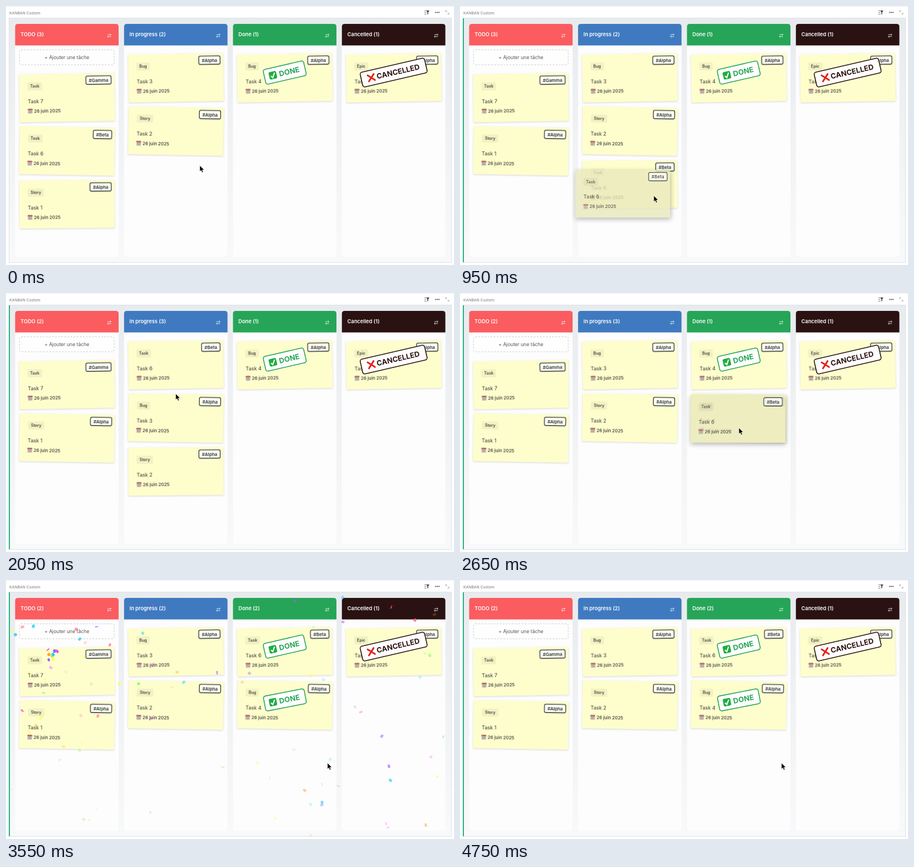
Animation, 800 px wide and 463 px high, one loop 4950 ms. Source, as an HTML page:

```html
<!DOCTYPE html>
<html lang="fr">
<head>
<meta charset="utf-8">
<title>Kanban</title>
<style>
  html, body { margin: 0; width: 100%; height: 100%; overflow: hidden; background: #fff; }
  svg { display: block; width: 100vw; height: 100vh; font-family: Inter, "Open Sans", sans-serif; }
  .card { filter: drop-shadow(.8px 1.6px 1.6px rgba(0, 0, 0, .16)); }
  .drag { filter: drop-shadow(1px 3px 4px rgba(0, 0, 0, .35)); opacity: .8; }
</style>
</head>
<body>
<svg id="stage" viewBox="0 0 800 463">
  <defs>
    <linearGradient id="board" x2="0" y2="1">
      <stop stop-color="#e8ebee"/><stop offset="1" stop-color="#f8f9fa"/>
    </linearGradient>
    <clipPath id="frame"><rect x="6" y="22" width="789" height="436"/></clipPath>
  </defs>
  <g id="back"></g>
  <g id="scene"></g>
</svg>
<script>
const LOOP = 4950, STEP = 50;
const back = document.getElementById('back');
const scene = document.getElementById('scene');

const columns = [
  { name: 'TODO', color: '#fa5c5f', top: 163.8 },
  { name: 'In progress', color: '#3f7ac0', top: 128.3 },
  { name: 'Done', color: '#26a558', top: 128.3 },
  { name: 'Cancelled', color: '#2b1212', top: 128.3 }
];
const tasks = {
  1: ['Story', '#Alpha'], 2: ['Story', '#Alpha'], 3: ['Bug', '#Alpha'], 4: ['Bug', '#Alpha'],
  5: ['Epic', '#Alpha'], 6: ['Task', '#Beta'], 7: ['Task', '#Gamma']
};
const badgeWidth = { Task: 26, Bug: 24, Story: 29.5, Epic: 25 };
const tagWidth = { '#Alpha': 38, '#Beta': 33, '#Gamma': 45 };
const tilts = [-1, 1, -.5];

// Board contents from each moment on: lists per column, then header counts.
const states = [
  { at: 0, lists: [[7, 6, 1], [3, 2], [4], [5]], counts: [3, 2, 1, 1] },
  { at: 750, lists: [[7, 1], [3, 2, 6], [4], [5]], counts: [3, 2, 1, 1] },
  { at: 1150, lists: [[7, 1], [6, 3, 2], [4], [5]], counts: [2, 3, 1, 1] },
  { at: 2400, lists: [[7, 1], [3, 6, 2], [4], [5]], counts: [2, 3, 1, 1] },
  { at: 2550, lists: [[7, 1], [3, 2], [4, 6], [5]], counts: [2, 3, 1, 1] },
  { at: 2850, lists: [[7, 1], [3, 2], [6, 4], [5]], counts: [2, 2, 2, 1] }
];
const drags = [
  { from: 650, to: 1100, dx: -55.5, dy: -3.5 },
  { from: 2250, to: 2800, dx: -2, dy: -16 }
];
const path = [
  [0, 346, 285], [50, 346, 285], [550, 165, 263], [600, 165, 263], [950, 346, 339], [1150, 346, 341],
  [1750, 314, 303], [1900, 314, 303], [2050, 303, 180], [2150, 305, 144], [2200, 305, 144],
  [2450, 346, 208], [2650, 498, 241], [2800, 498, 241], [3000, 574, 327]
];

const colX = i => 16.3 + 194.5 * i;
const rect = (x, y, w, h, attrs) => `<rect x="${x}" y="${y}" width="${w}" height="${h}" ${attrs}/>`;
const text = (x, y, size, weight, fill, str, attrs = '') =>
  `<text x="${x}" y="${y}" font-size="${size}" font-weight="${weight}" fill="${fill}" ${attrs}>${str}</text>`;
const line = (d, color, width, attrs = '') =>
  `<path d="${d}" fill="none" stroke="${color}" stroke-width="${width}" ${attrs}/>`;
const group = (x, y, angle, inner, attrs = '') =>
  `<g transform="translate(${x} ${y}) rotate(${angle})" ${attrs}>${inner}</g>`;

function background() {
  const dots = [767.3, 770.2, 773.1].map(x => `<circle cx="${x}" cy="11.5" r="1.1" fill="#444"/>`).join('');
  let out = rect(0, 0, 800, 463, 'fill="#fff"') + rect(0, 0, 800, 1, 'fill="#f0f0f0"') +
    text(6, 14.6, 6.8, 400, '#777', 'KANBAN Custom') +
    line('M747 8.5h3.5M747 11.5h3.5M747 14.5h4', '#777', .9) +
    '<path d="M750.5 8h5.5l-2 3.2v4l-1.5-1v-3z" fill="#444"/>' + dots +
    line('M785 11V8.5h2.5M791 12v2.500h-2.500M785.300 8.800l2 1.800M790.700 14.200l-2-1.800', '#aaa', .9) +
    rect(5.5, 21.5, 790, 437, 'fill="url(#board)" stroke="#dfe2e5" stroke-width="1"');
  columns.forEach((col, i) => {
    const x = colX(i);
    out += rect(x, 32, 184.8, 416.5, 'rx="5" fill="#fdfdfd"') +
      `<path d="M${x} 70.500v-33.500q0-5 5-5h174.800q5 0 5 5v33.500z" fill="${col.color}"/>` +
      line(`M${x + 165} 51.200h6.500m-1.800-1.700l1.800 1.700l-1.800 1.700M${x + 171.500} 54.700h-6.500m1.800-1.700l-1.800 1.700l1.800 1.700`, '#fff', .75);
  });
  return out + rect(24.2, 78.3, 169, 26.7, 'rx="3" fill="#fefefe" stroke="#c9c9c9" stroke-width="1" stroke-dasharray="3 2.5"') +
    text(108.8, 94.7, 8.6, 400, '#555', '+ Ajouter une tâche', 'text-anchor="middle"');
}

function stamp(done) {
  const w = done ? 74 : 118, color = done ? '#26a558' : '#2b1212';
  const icon = done
    ? rect(-28.5, -6.8, 13.6, 13.6, 'rx="2.500" fill="#1fae3f"') + line('M-25.500 .5l2.700 3.500l5-8', '#fff', 2.1)
    : line('M-46.500 -5.500l11 11M-35.500 -5.500l-11 11', '#e3231c', 3, 'stroke-linecap="round"');
  return group(0, -9.3, -12,
    rect(-w / 2, -13.5, w, 27, `rx="4" fill="#fff" fill-opacity=".96" stroke="${color}" stroke-width="1.600"`) +
    icon + text(done ? -10.3 : -31, 4.7, 13, 700, color, done ? 'DONE' : 'CANCELLED'));
}

function card(id, fill = '#fefecd') {
  const [kind, tag] = tasks[id], bw = badgeWidth[kind], tw = tagWidth[tag];
  return rect(-84.8, -42.8, 169.6, 85.6, `fill="${fill}"`) +
    rect(-70.2, -28.5, bw, 14.4, 'rx="2" fill="#000" fill-opacity=".05"') +
    text(-70.2 + bw / 2, -18.6, 7.2, 600, '#444', kind, 'text-anchor="middle"') +
    rect(79.4 - tw, -37.8, tw, 14.8, 'rx="2.500" fill="#fffff2" stroke="#2a2f36" stroke-width="1.300"') +
    text(79.4 - tw / 2, -27.5, 8, 600, '#2a2f36', tag, 'text-anchor="middle"') +
    text(-70, 8.8, 9, 400, '#333', 'Task ' + id) +
    rect(-70.3, 18.8, 8.6, 8.8, 'rx="1" fill="#d2cdc6"') +
    rect(-70.3, 18.8, 8.6, 2.8, 'rx=".8" fill="#b9635c"') +
    line('M-69 23.300h6M-69 25.700h6', '#857e78', 1.2, 'stroke-dasharray="1.500 .7"') +
    text(-59.3, 25.8, 8, 500, '#333', '26 juin 2025');
}

function cursorAt(t) {
  const i = path.findIndex(p => p[0] > t);
  if (i < 0) return path[path.length - 1].slice(1);
  const [t0, x0, y0] = path[i - 1], [t1, x1, y1] = path[i];
  const u = (t - t0) / (t1 - t0), k = u * u * (3 - 2 * u);
  return [x0 + (x1 - x0) * k, y0 + (y1 - y0) * k];
}

function makeConfetti() {
  const palette = ['#26ccff', '#a25afd', '#ff5e7e', '#88ff5a', '#fcff42', '#ffa62d', '#ff36ff'];
  let seed = 41;
  const rnd = () => (seed = seed * 16807 % 2147483647) / 2147483647;
  const bits = [];
  for (let birth = 3020; birth <= 4070; birth += 105) {
    for (const side of [.2, .75]) {
      const x = (side + (rnd() - .5) * .25) * 800, y = rnd() * 260 - 60;
      const count = birth === 3020 ? 24 : 9;
      for (let n = 0; n < count; n++) {
        const angle = rnd() * Math.PI * 2, reach = 70 + rnd() * 210;
        bits.push({
          birth, x, y, dx: Math.cos(angle) * reach, dy: Math.sin(angle) * reach,
          spin: rnd() * 360, wobble: rnd() * 6, round: rnd() < .3,
          color: palette[Math.floor(rnd() * palette.length)]
        });
      }
    }
  }
  return bits;
}
const bits = makeConfetti();

function confetti(t) {
  const life = 680;
  let out = '';
  for (const b of bits) {
    const age = t - b.birth;
    if (t < 3050 || age < 0 || age >= life) continue;
    const spread = 1 - Math.exp(-age / 90);
    const x = b.x + b.dx * spread, y = b.y + b.dy * spread + age * .34;
    const flat = .25 + .75 * Math.abs(Math.cos(b.wobble + age / 110));
    const shape = b.round
      ? `<ellipse rx="2.900" ry="${2.9 * flat}" fill="${b.color}"/>`
      : rect(-2.9, -2.3 * flat, 5.8, 4.6 * flat, `fill="${b.color}"`);
    out += group(x, y, b.spin + age * .4, shape, `opacity="${1 - age / life}"`);
  }
  return `<g clip-path="url(#frame)">${out}</g>`;
}

function draw(t) {
  const state = states.filter(s => s.at <= t).pop();
  const [x, y] = cursorAt(t);
  let out = t >= 650 ? rect(5, 22, 2, 436, 'fill="#22b184"') : '';
  columns.forEach((col, i) => {
    out += text(colX(i) + 9.8, 54.4, 9.2, 600, '#fff', `${col.name} (${state.counts[i]})`);
    state.lists[i].forEach((id, row) => {
      const stamped = i === 3 || i === 2 && (id === 4 || t >= 2850);
      const body = `<g class="card">${card(id)}</g>` + (stamped ? stamp(i === 2) : '');
      out += group(colX(i) + 92.6, col.top + 95.3 * row, tilts[row], body);
    });
  });
  const drag = drags.find(d => t >= d.from && t < d.to);
  if (drag) out += group(x + drag.dx, y + drag.dy, 0, card(6, '#e9e9bc'), 'class="drag"');
  out += confetti(t);
  out += group(x, y, 0, '<path d="M0 0v11l2.500-2.300l1.700 4l2-.9l-1.700-3.800h3.500z" fill="#000" stroke="#fff" stroke-width=".7"/>');
  scene.innerHTML = out;
}

back.innerHTML = background();
const start = performance.now();
let shown = -1;
function tick() {
  const t = Math.floor((performance.now() - start) % LOOP / STEP) * STEP;
  if (t !== shown) draw(shown = t);
  requestAnimationFrame(tick);
}
tick();
</script>
</body>
</html>
```
